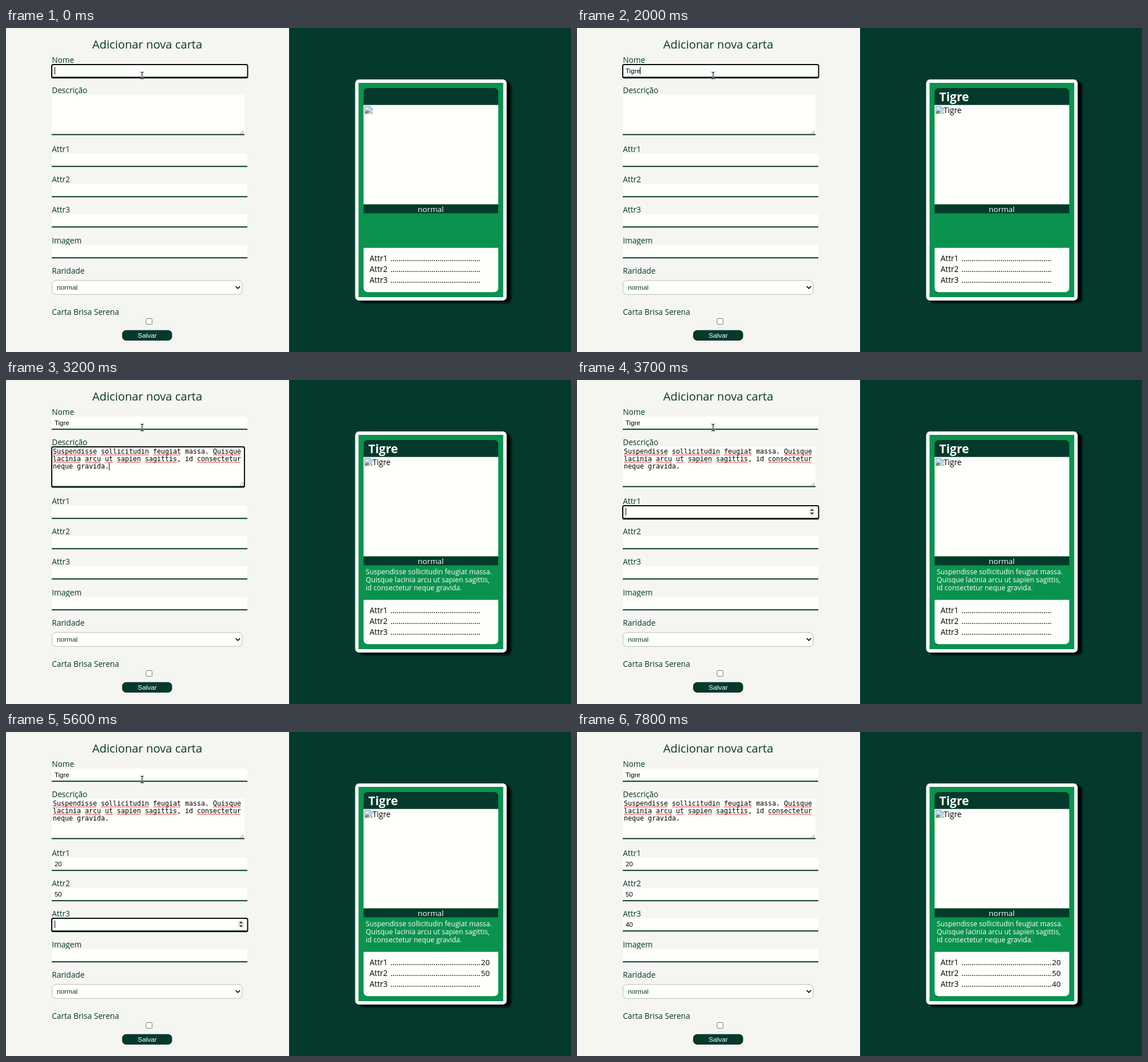
An HTML page that plays this animation: 988 by 567 pixels, repeating every 8000 ms.

```html
<!DOCTYPE html>
<html lang="pt">
<head>
<meta charset="utf-8">
<title>Adicionar nova carta</title>
<style>
  html, body { margin: 0; width: 100%; height: 100%; overflow: hidden; background: #f5f5f2; }
  svg { display: block; }
  text { font-family: "Open Sans", "Noto Sans", sans-serif; font-size: 13.7px; white-space: pre; }
  .ink { fill: #033a2c; }
  .paper { fill: #fffffb; }
  .leaf { fill: #0a924e; }
  .entry { font-family: "Liberation Sans", Arial, sans-serif; font-size: 11.4px; }
  .ui { font-family: "Liberation Sans", Arial, sans-serif; font-size: 11.8px; }
  .mono { font-family: "DejaVu Sans Mono", monospace; font-size: 11.63px; }
  .story { font-size: 12.2px; }
  .dots { letter-spacing: -.22px; }
</style>
</head>
<body>
<svg id="stage" width="988" height="567" viewBox="0 0 988 567">
  <defs>
    <filter id="soft" x="-10%" y="-10%" width="120%" height="120%"><feGaussianBlur stdDeviation="2"/></filter>
  </defs>
  <rect width="988" height="567" fill="#f5f5f2"/>
  <rect class="ink" x="495" width="493" height="567"/>
  <text class="ink" x="247" y="35.7" text-anchor="middle" style="font-size:20.2px">Adicionar nova carta</text>

  <g id="form"></g>

  <rect class="paper" x="80.5" y="441.8" width="332.5" height="24.5" rx="7" stroke="#b4bab5"/>
  <text class="ui ink" x="89" y="458">normal</text>
  <path d="M401.8 452l3.7 3.8l3.7-3.8" fill="none" stroke="#033a2c" stroke-width="1.9"/>
  <rect x="245" y="508.5" width="10.5" height="10" rx="2" fill="#fff" stroke="#767676"/>
  <rect class="ink" x="203.5" y="529.2" width="86.5" height="17.3" rx="6.5" stroke="#0d2a21"/>
  <text class="ui paper" x="247" y="542" text-anchor="middle">Salvar</text>

  <rect x="617" y="94" width="266" height="387" rx="7" filter="url(#soft)"/>
  <rect class="paper" x="610.5" y="90" width="265" height="387" rx="7"/>
  <rect class="leaf" x="616.5" y="96" width="253" height="375"/>
  <path class="ink" d="M625.3 135v-22q0-8 8-8h219.5q8 0 8 8v22z"/>
  <rect class="paper" x="625.3" y="134.7" width="235.5" height="174"/>
  <rect class="ink" x="625.3" y="308.7" width="235.5" height="15.6"/>
  <path class="paper" d="M625.3 384.7h235.5v69.5q0 8-8 8h-219.5q-8 0-8-8z"/>
  <g id="broken">
    <path d="M627.5 137h9.5l3.5 3.5v3.5l-7 6h-6z" fill="#c3d9f5" stroke="#9a9a9a"/>
    <path d="M637 137v3.5h3.5" fill="#fff" stroke="#9a9a9a"/>
    <path d="M628 149.5v-2.5q3-4.500 6.500-1.500l1 1.500l-3 2.500z" fill="#54a852"/>
    <circle cx="631" cy="140.500" r="1.300" fill="#fff"/>
    <path d="M636.500 150l4-3.500v3.500z" fill="#c3d9f5" stroke="#9a9a9a" stroke-width=".8"/>
  </g>
  <text class="paper" id="cardName" x="633.5" y="128" style="font-size:21px;font-weight:700"></text>
  <text id="alt" x="641" y="149"></text>
  <text class="paper" x="742.8" y="322" text-anchor="middle" style="font-size:13.5px">normal</text>
  <g id="story"></g>
  <g id="stats"></g>

  <g id="focus">
    <rect id="ring" fill="none" stroke="#080c0a" stroke-width="2" rx="2.5"/>
    <g id="spinner">
      <rect x="-5.5" y="-7" width="11" height="14" fill="#efefef"/>
      <path d="M-3.600-1.500L0-5.300L3.600-1.500zM-3.600 1.500L0 5.300L3.600 1.500z" fill="#454545"/>
    </g>
    <rect id="caret" width="1" height="13"/>
  </g>
  <g id="beam" fill="none">
    <path id="beamHalo" d="M235 77q3 0 3 2q0-2 3-2M238 79v8M235 89q3 0 3-2q0 2 3 2" stroke="#fff" stroke-width="2.600"/>
    <path d="M235 77q3 0 3 2q0-2 3-2M238 79v8M235 89q3 0 3-2q0 2 3 2" stroke="#111" stroke-width="1.200"/>
  </g>
  <path id="arrow" d="M0 0v14l3.300-3l2.200 5l2.300-1l-2.200-4.800h4.600z" fill="#111" stroke="#fff"/>
</svg>
<script>
const LOOP = 8000;
const NS = "http://www.w3.org/2000/svg";
const $ = id => document.getElementById(id);

function add(parent, tag, attrs, content = "") {
  const el = document.createElementNS(NS, tag);
  for (const key in attrs) el.setAttribute(key, attrs[key]);
  el.textContent = content;
  return parent.appendChild(el);
}
const show = (el, on) => el.setAttribute("visibility", on ? "inherit" : "hidden");
const put = (el, text) => { if (el.textContent !== text) el.textContent = text; };

const AREA = 1, IMAGE = 5;
const areaLines = [
  "Suspendisse sollicitudin feugiat massa. Quisque",
  "lacinia arcu ut sapien sagittis, id consectetur",
  "neque gravida."
];
const cardLines = [
  "Suspendisse sollicitudin feugiat massa.",
  "Quisque lacinia arcu ut sapien sagittis,",
  "id consectetur neque gravida."
];
const knownWords = ["massa", "id", "neque", "gravida"];
const filled = "filled";

// time, focused field, its value, caret visible
const steps = [
  [0, 0, "", 1], [300, 0, "", 0], [700, 0, "T", 1], [1300, 0, "T", 0],
  [1500, 0, "Ti", 1], [1900, 0, "Tig", 1], [2000, 0, "Tigre", 1],
  [2400, AREA, "", 1], [3000, AREA, "", 0], [3200, AREA, filled, 1],
  [3700, 2, "", 1], [4300, 2, "", 0], [4500, 2, "2", 1], [4600, 2, "20", 1],
  [4900, 3, "", 1], [5100, 3, "5", 1], [5400, 3, "50", 1],
  [5600, 4, "", 1], [5900, 4, "4", 1], [6100, 4, "40", 1],
  [6900, IMAGE, "", 1], [7500, IMAGE, "", 0], [7800, -1, "", 0]
];

const form = $("form");
const labels = ["Nome", "Descrição", "Attr1", "Attr2", "Attr3", "Imagem", "Raridade", "Carta Brisa Serena"];
const labelY = i => i < 2 ? 61 + i * 53 : i < 7 ? 217 + (i - 2) * 53.2 : 502;
labels.forEach((name, i) => add(form, "text", { class: "ink", x: 80.2, y: labelY(i) }, name));

const fields = labels.slice(0, 6).map((_, i) => {
  const area = i === AREA;
  const y = i ? area ? 117 : 220 + Math.round((i - 2) * 53.2) : 64;
  const f = { x: 80, y, w: area ? 337 : 342, h: area ? 70.5 : 23.2 };
  add(form, "rect", { class: "paper", x: f.x, y, width: f.w, height: f.h });
  add(form, "rect", { class: "ink", x: f.x, y: y + f.h - 2, width: f.w, height: 2 });
  if (!area) f.text = add(form, "text", { class: "entry", x: 85, y: y + 15 });
  return f;
});
add(form, "path", { d: "M409.500 185l6-6M413 185l2.500-2.500", stroke: "#777", "stroke-width": .9 });

const CHAR = 7;
function wave(x, y, width) {
  let d = `M${x} ${y}`;
  for (let i = 0; i + 2 <= width; i += 2) d += `l2 ${i % 4 ? -1.5 : 1.5}`;
  return d;
}
const areaText = add(form, "g", {});
areaLines.forEach((line, row) => {
  const y = 129 + row * 13;
  add(areaText, "text", { class: "mono", x: 82, y }, line);
  for (const m of line.matchAll(/[a-z]+/gi)) {
    if (knownWords.includes(m[0])) continue;
    add(areaText, "path", {
      d: wave(82 + m.index * CHAR, y + 1.3, m[0].length * CHAR),
      fill: "none", stroke: "#d22", "stroke-width": .9
    });
  }
});

cardLines.forEach((line, i) =>
  add($("story"), "text", { class: "story paper", x: 629, y: 340.3 + i * 14 }, line));

const stats = [1, 2, 3].map((n, i) => {
  const y = 408 + i * 19.2;
  add($("stats"), "text", { x: 635.7, y }, "Attr" + n);
  add($("stats"), "text", { class: "dots", x: 672.3, y }, ".".repeat(46));
  return add($("stats"), "text", { x: 830.5, y, style: "font-size:13.500px" });
});

function drawFocus(index, value, caretOn) {
  const f = fields[index];
  show($("focus"), !!f);
  if (!f) return;
  const ring = { x: f.x, y: f.y, width: f.w + (index === AREA ? 0 : .5), height: f.h };
  for (const key in ring) $("ring").setAttribute(key, ring[key]);
  show($("spinner"), index > AREA && index < IMAGE);
  $("spinner").setAttribute("transform", `translate(411 ${f.y + 10.5})`);
  let x = 85, y = f.y + 4;
  if (index === AREA) {
    const last = areaLines.length - 1;
    x = value ? 82 + areaLines[last].length * CHAR : 82;
    y = 119 + (value ? last * 13 : 0);
  } else if (value) {
    x += Math.floor(f.text.getComputedTextLength());
  }
  $("caret").setAttribute("x", x);
  $("caret").setAttribute("y", y);
  show($("caret"), caretOn);
}

function drawPointer(t) {
  const moving = t >= 7200 && t < 7800;
  show($("beam"), t < 7200);
  show($("arrow"), moving);
  if (!moving) return;
  const k = Math.min(4, Math.floor((t - 7200) / 100) + 1) / 4;
  const ease = k * k * (3 - 2 * k);
  $("arrow").setAttribute("transform", `translate(${238 + 538 * ease} ${78 + 150 * ease})`);
}

function draw(t) {
  const values = Array(6).fill("");
  let now = steps[0];
  for (const step of steps) {
    if (step[0] > t) break;
    now = step;
    if (step[1] >= 0) values[step[1]] = step[2];
  }
  fields.forEach((f, i) => f.text && put(f.text, values[i]));
  stats.forEach((el, i) => put(el, values[i + 2]));
  put($("cardName"), values[0]);
  put($("alt"), values[0]);
  show(areaText, values[AREA]);
  show($("story"), values[AREA]);
  drawFocus(now[1], now[2], now[3]);
  drawPointer(t);
}

const start = performance.now();
function tick() {
  draw((performance.now() - start) % LOOP);
  requestAnimationFrame(tick);
}
tick();
</script>
</body>
</html>
```
